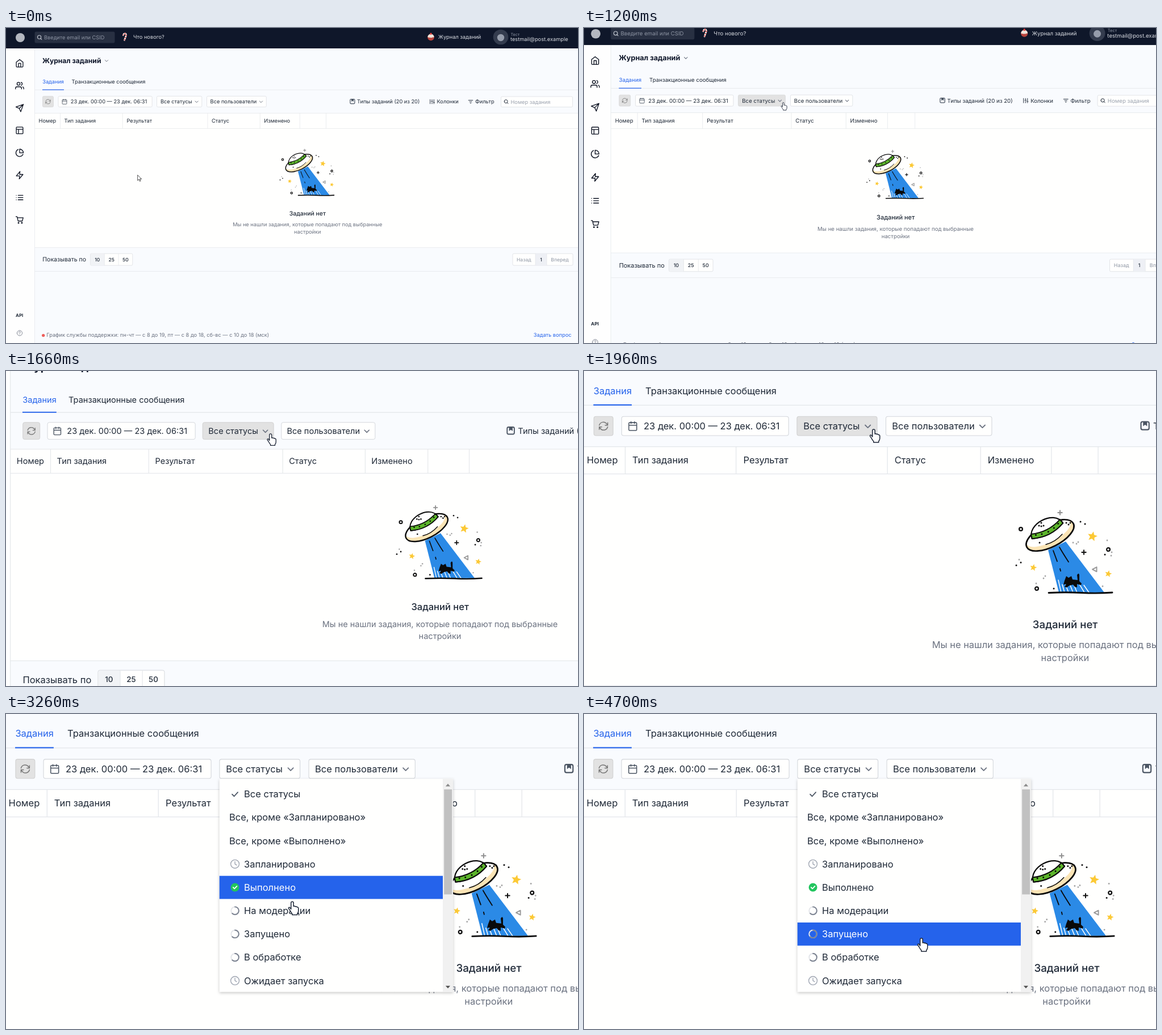
These frames come from a looping animation (1007 by 556 pixels, 7.03 s). An HTML page:

```html
<!DOCTYPE html>
<html lang="ru">
<head>
<meta charset="utf-8">
<title>Журнал заданий</title>
<style>
  html, body { margin: 0; width: 100%; height: 100%; overflow: hidden; background: #f9fbfe; }
  svg { display: block; width: 100%; height: 100%; }
  text { font-family: Inter, "Open Sans", sans-serif; text-rendering: geometricPrecision; white-space: pre; }
  .box { fill: #fffffe; stroke: #d3d6db; stroke-width: .6; }
  .grey { fill: #e2e2e2; stroke: #d0d0d0; }
  .line { stroke: #e3e6ea; stroke-width: .7; fill: none; }
  .row rect { fill: none; }
  .row.on rect { fill: #2563eb; }
  .row.on text { fill: #fff; }
  #status.on { fill: #e2e2e2; stroke: #d0d0d0; }
  #list { filter: drop-shadow(0 1px 1.5px rgba(0, 0, 0, .22)); }
</style>
</head>
<body>
<svg viewBox="0 0 1007 556"><g id="camera"></g></svg>
<script>
const LOOP = 7030, FRAME = 100 / 3;
const ZOOM = 1.786, CX = 125, CY = 172;
const ROW_TOP = 143.45, ROW_H = 23.05;
const INK = '#1f2937', GREY = '#6b7280', PALE = '#9ca3af', BLUE = '#2563eb', BLACK = '#0a0a0a';
const BODY = 9.25, SMALL = 8.52, LARGE = 10.5;

// Text with the capitals centred on y
const text = (x, y, str, { size = BODY, fill = INK, weight = 400, anchor = 'start' } = {}) =>
  `<text x="${x}" y="${y + size * .363}" font-size="${size}" font-weight="${weight}" fill="${fill}" text-anchor="${anchor}">${str}</text>`;
const rect = (x, y, w, h, attrs = '') => `<rect x="${x}" y="${y}" width="${w}" height="${h}" ${attrs}/>`;
const box = (x, y, w, h, extra = '', id = '') => rect(x, y, w, h, `rx="2" class="box ${extra}" ${id && `id="${id}"`}`);
const circle = (x, y, r, fill) => `<circle cx="${x}" cy="${y}" r="${r}" fill="${fill}"/>`;
const line = d => `<path class="line" d="${d}"/>`;
const stroke = (d, color, w, extra = '') =>
  `<path d="${d}" fill="none" stroke="${color}" stroke-width="${w}" stroke-linecap="round" stroke-linejoin="round" ${extra}/>`;
// Line icon on a 24 unit grid, centred on x, y
const icon = (x, y, d, size = 15.7, color = '#0b1120', w = 2) =>
  `<g transform="translate(${x} ${y}) scale(${size / 24}) translate(-12 -12)">${stroke(d, color, w)}</g>`;
const ring = (x, y, r) => `M${x - r} ${y}a${r} ${r} 0 1 1 ${2 * r} 0a${r} ${r} 0 1 1 ${-2 * r} 0`;
const chevron = (x, y) => stroke(`M${x - 2.6} ${y - 1.3}l2.6 2.6 2.6-2.6`, GREY, 1);

const LENS = ring(11, 11, 7.5) + 'M21 21l-4.6-4.6';
const CLOCK = ring(12, 12, 10) + 'M12 6v6l4 2.5';

function topBar() {
  const cane = 'M208.5 21.5l3-8.5q.5-3.2-2-3.2t-3.2 3';
  return rect(0, 0, 1007, 36, 'fill="#0f172a"') +
    circle(25, 17, 8, '#b4b8c0') +
    rect(50.5, 6.5, 141, 20, 'rx="2.5" fill="#283042"') +
    icon(59, 16.5, LENS, 10, '#c3c8d1', 2.8) +
    text(67, 16.5, 'Введите email или CSID', { fill: '#8d94a3' }) +
    stroke(cane, '#f3f0ee', 2.6) +
    stroke(cane, '#d8403f', 2.6, 'stroke-dasharray="1.6 2.6" style="stroke-linecap:butt"') +
    text(224, 16, 'Что нового?', { fill: '#d9dce2' }) +
    circle(748, 16.5, 5.8, '#b8443d') +
    '<path d="M742.3 15.5a5.8 5.8 0 0 1 11.4 0q-1.5 2.4-2.8.6-1.4 2.6-3 .4-1.5 2-2.7-.2-1.5 1.6-2.9-.8z" fill="#f2e6dc"/>' +
    circle(748, 10.2, 1.8, '#e0433f') +
    text(761, 16, 'Журнал заданий', { fill: '#d9dce2' }) +
    circle(871, 16, 13.3, '#343c4e') +
    circle(871, 17, 6.2, '#969dab') +
    text(888.5, 11, 'Тест', { size: 7.2, fill: '#8d94a3' }) +
    text(888, 20, 'testmail@post.example', { fill: '#d9dce2' });
}

function sidebar() {
  const icons = [
    'M3 9l9-7 9 7v11a2 2 0 0 1-2 2H5a2 2 0 0 1-2-2zM9 22V12h6v10',
    'M17 21v-2a4 4 0 0 0-4-4H5a4 4 0 0 0-4 4v2M23 21v-2a4 4 0 0 0-3-3.87M16 3.13a4 4 0 0 1 0 7.75' + ring(9, 7, 4),
    'M22 2L11 13M22 2l-7 20-4-9-9-4z',
    'M5 3h14a2 2 0 0 1 2 2v14a2 2 0 0 1-2 2H5a2 2 0 0 1-2-2V5a2 2 0 0 1 2-2zM3 9h18M9 21V9',
    'M21.2 15.9A10 10 0 1 1 8 2.8M22 12A10 10 0 0 0 12 2v10z',
    'M13 2L3 14h9l-1 8 10-12h-9z',
    'M8 6h13M8 12h13M8 18h13M3 6h.01M3 12h.01M3 18h.01',
    'M2 3h3l3 12h11l2.5-9H6' + ring(9, 20, 1.2) + ring(18, 20, 1.2)
  ];
  return rect(0, 36, 50.5, 520, 'fill="#fefefe"') + line('M50.5 36V556') +
    icons.map((d, i) => icon(24, 62.3 + i * 39.5, d)).join('') +
    text(23.7, 507.5, 'API', { size: 7.9, weight: 700, anchor: 'middle' }) +
    icon(24, 538.5, ring(12, 12, 10) + 'M9 9a3 3 0 1 1 4.5 2.6Q12 12.5 12 14M12 17.5h.01', 11, GREY, 1.8);
}

function toolbar() {
  return text(64, 57.5, 'Журнал заданий', { size: 12.1, weight: 700, fill: '#0f172a' }) + chevron(177, 58) +
    text(64.2, 94.9, 'Задания', { fill: BLUE }) +
    text(115.5, 94.9, 'Транзакционные сообщения') +
    line('M50.5 109.2H1007') + rect(64, 108.4, 38, 1.2, `fill="${BLUE}"`) +
    box(64.5, 120.4, 19, 19, 'grey') +
    icon(74, 130, 'M2 10A10 10 0 0 1 20 7l2 3M22 4v6h-6M22 14A10 10 0 0 1 4 17l-2-3M2 20v-6h6', 10, '#777', 2) +
    box(92, 120.4, 165.2, 19) +
    icon(103, 130, 'M5 4h14a2 2 0 0 1 2 2v14a2 2 0 0 1-2 2H5a2 2 0 0 1-2-2V6a2 2 0 0 1 2-2zM16 2v4M8 2v4M3 10h18', 10.4, '#4b5563', 2) +
    text(113.8, 129.9, '23 дек. 00:00 — 23 дек. 06:31') +
    box(265.5, 120.4, 79.3, 19, '', 'status') + text(271.9, 129.9, 'Все статусы') + chevron(335.6, 130.3) +
    box(353.5, 120.4, 104.8, 19) + text(359.6, 129.9, 'Все пользователи') + chevron(449, 130.3) +
    rect(605.9, 125.6, 8, 8, 'rx="1.6" fill="none" stroke="#4b5563" stroke-width="1.2"') +
    '<path d="M608 125.6h4v4.5l-2-1.5-2 1.5z" fill="#4b5563"/>' +
    text(618, 129.9, 'Типы заданий (20 из 20)') +
    icon(750, 130, 'M4 3v18M12 3v8M12 15v6M20 3v12M20 19v2M9 11h6M17 16h6', 10, INK, 2.2) +
    text(758.5, 129.9, 'Колонки') +
    icon(818, 130, 'M3 6h18M7 12h10M10 18h4', 10, INK, 2.2) +
    text(826, 129.9, 'Фильтр') +
    box(871.5, 121, 126, 18.5) + icon(880.5, 130, LENS, 9.5, INK, 2.4) +
    text(888.5, 130.3, 'Номер задания', { fill: PALE });
}

function table() {
  const heads = [[57.6, 'Номер'], [102.5, 'Тип задания'], [212.4, 'Результат'], [362, 'Статус'], [454.2, 'Изменено']];
  const rules = [95.5, 205.2, 355, 447.2, 517.3, 563.5];
  const note = { fill: GREY, anchor: 'middle' };
  return rect(50.5, 150.4, 957, 237, 'fill="#fffffe"') +
    line('M50.5 150.4H1007M50.5 177.4H1007' + rules.map(x => `M${x} 150.4v27`).join('')) +
    heads.map(([x, s]) => text(x, 163.8, s)).join('') +
    `<g transform="scale(${1 / 1.779}) translate(97.4 134)">${ufo()}</g>` +
    text(530.9, 326.8, 'Заданий нет', { size: LARGE, weight: 500, anchor: 'middle' }) +
    text(530.8, 346.6, 'Мы не нашли задания, которые попадают под выбранные', note) +
    text(530.8, 359.7, 'настройки', note);
}

function star(x, y, r) {
  const pts = Array.from({ length: 10 }, (_, i) => {
    const a = i * Math.PI / 5 - 1.35, k = i % 2 ? r * .45 : r;
    return `${x + k * Math.cos(a)},${y + k * Math.sin(a)}`;
  });
  return `<polygon points="${pts.join(' ')}" fill="#fcc935"/>`;
}

function ufo() {
  const dots = (list, r, fill) => list.map(([x, y]) => circle(x, y, r, fill)).join('');
  const plus = (x, y, c) => stroke(`M${x - 3.7} ${y}h7.4M${x} ${y - 3.7}v7.4`, c, 2);
  const streaks = [[840, -5, -22], [846, -4, -14], [853, -5, -13], [861, -6, -15], [868, -5, -12], [881, -12, -20], [889, -9, -13]];
  return '<path d="M817 316L836 391H916L848 301z" fill="#2b8ae6"/>' +
    streaks.map(([x, dx, dy]) => stroke(`M${x} 391l${dx} ${dy}`, '#fff', 1.5)).join('') +
    stroke('M826 317l7 19M837 311q5 9 16 26M838 349l1 4', BLACK, 1.8) +
    stroke('M818 391.5q30-1.5 58 0t54-.5', BLACK, 2.8) +
    `<path d="M846 370l3-8 4 3 5-3 2 6 9 1-1-9q3-5 4 0l0 11 4 4-1 3-7-2 0 6-4-1-3-4-7 2-4 3-4-1 3-5-5 1z" fill="${BLACK}"/>` +
    `<g transform="translate(820.5 290) rotate(-27)" stroke="${BLACK}" stroke-linejoin="round">` +
      '<ellipse rx="46" ry="20.5" fill="#fbe4b5" stroke="none"/>' +
      '<ellipse cx="-1" cy="-5" rx="43" ry="16.5" fill="#fff" stroke="none"/>' +
      '<ellipse rx="46" ry="20.5" fill="none" stroke-width="2.7"/>' +
      '<path d="M-31-9C-29-36 27-38 30-9Q0 3-31-9z" fill="#fff" stroke-width="2.2"/>' +
      '<path d="M-31-9Q0 4 30-9L28-17Q0-6-29-17z" fill="#5cb52b" stroke-width="2"/>' +
      stroke('M-14 11q16 4 34-3', BLACK, 1.5) +
      [-22, -12, 0, 12, 22].map(x => `<circle cx="${x}" cy="${-7 - x * x * .01}" r="1.5" fill="${BLACK}" stroke="none"/>`).join('') +
    '</g>' +
    dots([[805, 268], [801, 273], [809, 273], [805, 274], [849, 268], [856, 268], [853, 271], [802, 303], [874, 266], [882, 270], [761, 343], [769, 338], [917, 324], [827, 384]], 1.5, '#111') +
    dots([[861, 303], [867, 305], [870, 302], [921, 299], [928, 326], [929, 320], [766, 333], [796, 375], [809, 366], [812, 362], [913, 380]], 1.4, '#a3a3a3') +
    star(895, 292, 9) + star(791, 347, 6.3) + star(923, 358, 6.3) +
    [[769, 279], [923, 315], [797, 384]].map(p => stroke(ring(...p, 2.9), '#111', 2.3)).join('') +
    plus(838, 250, '#8f8f8f') + plus(880, 320, '#111') +
    stroke('M895 350l7.5-4v8z', '#9a9a9a', 2);
}

function footer() {
  const num = (x, s, fill = INK) => text(x, 408.6, s, { size: SMALL, weight: 500, anchor: 'middle', fill });
  return line('M50.5 387.6H1007M50.5 429.5H1007') +
    text(64.3, 408.6, 'Показывать по', { size: LARGE }) +
    box(148.5, 398.2, 74.3, 20.8) + rect(148.8, 398.5, 24.5, 20.2, 'rx="1.5" fill="#f1f3f6"') +
    line('M173.3 398.2v20.8M198.1 398.2v20.8') +
    num(160.8, '10') + num(185.6, '25') + num(210.4, '50') +
    box(892, 398.2, 106, 20.8) + rect(932, 398.5, 20, 20.2, 'fill="#eef0f5"') +
    line('M932 398.2v20.8M952 398.2v20.8') +
    num(911.8, 'Назад', PALE) + num(942, '1') + num(975, 'Вперед', PALE) +
    circle(65.7, 542.6, 2.7, '#ee5f5b') +
    text(71.3, 542, 'График службы поддержки: пн-чт — с 8 до 19, пт — с 8 до 18, сб-вс — с 10 до 18 (мск)', { fill: GREY }) +
    text(995.5, 542, 'Задать вопрос', { fill: BLUE, anchor: 'end' });
}

const marks = {
  check: y => stroke(`M277.9 ${y + .2}l2 2 3.6-4`, '#4b5563', 1),
  clock: y => icon(280.7, y, CLOCK, 10, PALE, 1.8),
  done: y => circle(280.7, y, 4.2, '#22c55e') + stroke(`M278.9 ${y}l1.3 1.3 2.4-2.5`, '#fff', 1),
  spin: y => stroke(ring(280.7, y, 3.8), '#e4e6ea', 1.1) +
    stroke(`M280.7 ${y - 3.8}a3.8 3.8 0 0 1 0 7.6q-1.5 0-2.7-1.1`, '#7b8290', 1.1)
};

function dropdown() {
  const rows = [
    ['Все статусы', 'check'], ['Все, кроме «Запланировано»'], ['Все, кроме «Выполнено»'],
    ['Запланировано', 'clock'], ['Выполнено', 'done'], ['На модерации', 'spin'],
    ['Запущено', 'spin'], ['В обработке', 'spin'], ['Ожидает запуска', 'clock']
  ];
  return '<g id="list">' + rect(265.4, 139.8, 230.3, 210.6, 'fill="#fffffe"') +
    rows.map(([s, mark], i) => {
      const top = ROW_TOP + i * ROW_H, y = top + ROW_H / 2 - .15;
      return `<g class="row">${rect(265.4, top, 220.2, ROW_H - .2)}${mark ? marks[mark](y) : ''}${text(mark ? 289.6 : 275, y, s)}</g>`;
    }).join('') +
    rect(485.6, 139.8, 10.1, 210.6, 'fill="#f1f1f1"') +
    rect(486.8, 150.2, 7.8, 103.8, 'fill="#c1c1c1"') +
    '<path d="M488.3 147.2h4.6l-2.3-2.6z" fill="#8a8a8a"/>' +
    '<path d="M488.3 344.3h4.6l-2.3 2.6z" fill="#505050"/></g>';
}

function cursors() {
  return '<path id="arrow" d="M0 0V9.7L2.3 7.6 3.8 11.1 5.4 10.4 3.9 7H7z" fill="#fff" stroke="#222" stroke-width=".8"/>' +
    '<g id="hand"><path transform="scale(.56) translate(-7.2 -.8)" fill="#fff" stroke="#1c2536" stroke-width="1.5" stroke-linejoin="round" ' +
    'd="M5 14V3a2.2 2.2 0 0 1 4.4 0V9a2 2 0 0 1 3 .6a2 2 0 0 1 3 .8a2 2 0 0 1 2.6 1.8V17q0 3-2 5V24H7V22q-2-2-4-6L.8 13q-.4-2.6 2-2z"/></g>';
}

const $ = id => document.getElementById(id);
$('camera').innerHTML = table() + toolbar() + footer() + sidebar() + topBar() + dropdown() + cursors();
const camera = $('camera'), list = $('list'), statusBox = $('status'), arrow = $('arrow'), hand = $('hand');
const rowEls = [...document.querySelectorAll('.row')];

function ease(t, from, to, power) {
  const u = Math.min(1, Math.max(0, (t - from) / (to - from)));
  return u < .5 ? (2 * u) ** power / 2 : 1 - (2 - 2 * u) ** power / 2;
}
const handY = t => 133.2 + 164.1 * ease(t, 2833, 3533, 3);
const handX = t => 341.4 - 5.4 * ease(t, 2833, 3533, 3) + 51.6 * ease(t, 3533, 4633, 2);
const move = (el, x, y) => el.setAttribute('transform', `translate(${x} ${y})`);
const show = (el, on) => el.setAttribute('visibility', on ? 'visible' : 'hidden');

function draw(now) {
  const t = Math.floor((now % LOOP + 7) / FRAME) * FRAME;
  const scale = 1 + (ZOOM - 1) * ease(t, 1033.3, 2033.3, 2);
  camera.setAttribute('transform', `translate(${CX} ${CY}) scale(${scale}) translate(${-CX} ${-CY})`);

  const pointing = t >= 1030;
  const p = ease(t, 283, 1013, 2);
  move(arrow, 231.7 + 108.1 * p, 259.5 - 124.2 * p);
  move(hand, handX(t), handY(t));
  show(arrow, !pointing);
  show(hand, pointing);

  // Highlights trail the pointer by one picture
  const y = handY(t - FRAME);
  const active = Math.max(0, Math.floor((y - ROW_TOP) / ROW_H));
  statusBox.classList.toggle('on', pointing && y < 140);
  list.style.display = t >= 2230 ? '' : 'none';
  rowEls.forEach((el, i) => el.classList.toggle('on', i === active));
}

function tick() {
  draw(performance.now());
  requestAnimationFrame(tick);
}
tick();
</script>
</body>
</html>
```
